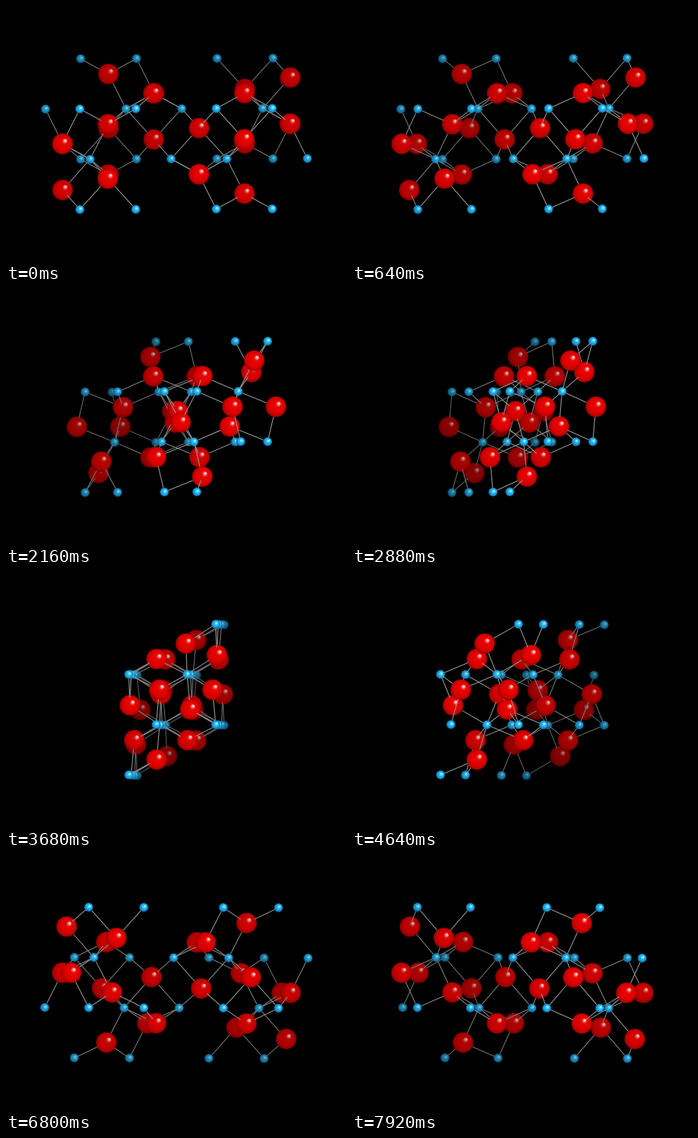
Animation, 456 px wide and 342 px high, one loop 8 s. Source, as an HTML page with a canvas:

```html
<!DOCTYPE html>
<html lang="en">
<head>
<meta charset="utf-8">
<title>Rotating crystal</title>
<style>
html, body { margin: 0; width: 100%; height: 100%; overflow: hidden; background: #000; }
canvas { display: block; }
</style>
</head>
<body>
<canvas id="stage" width="456" height="342"></canvas>
<script>
const ctx = document.getElementById('stage').getContext('2d');
const CX = 228.5, CY = 171.4;
const STEP = 80, STEPS = 100, TURN = 2, START = 0.5;

const LAYER = 30.5;                  // half the spacing of oxygen layers
const ROW = 33.7;                    // half the spacing of metal rows
const COL = 19.45;                   // half the spacing of metal columns
const R = 41.3;                      // oxygen distance from its column axis
const RY = R / 2, RZ = R * Math.sqrt(3) / 2;

const RED = {
  r: 13.8, hx: 4.6, hy: -4.8,
  stops: [[0, 255, 245, 240], [0.09, 255, 190, 185], [0.2, 246, 60, 55],
          [0.29, 232, 6, 6], [0.7, 222, 0, 0], [0.88, 196, 0, 0], [1, 140, 0, 0]]
};
const BLUE = {
  r: 6, hx: 1.6, hy: -1.6,
  stops: [[0, 215, 255, 255], [0.22, 100, 225, 255], [0.45, 42, 184, 240],
          [0.75, 26, 152, 212], [1, 12, 92, 140]]
};

const atoms = [];

// Adds an atom and its mirror through the centre.
function addPair(kind, x, y, z) {
  atoms.push({ kind, x, y, z }, { kind, x: -x, y: -y, z: -z });
}

function addMetals(xs, y, z) {
  for (const x of xs) addPair(BLUE, x, y, z);
}

addMetals([-129, -54, 54, 129], -3 * ROW, 3 * COL);
addMetals([-129, -54, 54, 129], -ROW, -3 * COL);
addMetals([-175.8, -67.8, 7, 115.5], -ROW, COL);

addPair(RED, -3 * LAYER, -3 * ROW + RY, 3 * COL - RZ);
addPair(RED, 3 * LAYER, -3 * ROW + R, 3 * COL);
addPair(RED, 5 * LAYER, -ROW - R, COL);
addPair(RED, -LAYER, -ROW - RY, COL - RZ);
addPair(RED, -LAYER, -ROW - RY, COL + RZ);
addPair(RED, 3 * LAYER, -ROW - RY, -3 * COL + RZ);
addPair(RED, -3 * LAYER, -ROW + RY, -3 * COL + RZ);
addPair(RED, 5 * LAYER, -ROW + RY, COL - RZ);
addPair(RED, 5 * LAYER, -ROW + RY, COL + RZ);
addPair(RED, -3 * LAYER, ROW - R, 3 * COL);
addPair(RED, LAYER, ROW - R, -COL);

const bonds = [];
for (const a of atoms) {
  if (a.kind !== RED) continue;
  for (const b of atoms) {
    if (b.kind !== BLUE) continue;
    const len = Math.hypot(a.x - b.x, a.y - b.y, a.z - b.z);
    if (len < 66) bonds.push({ a, b, from: RED.r / len, to: 1 - BLUE.r / len });
  }
}

const light = depth => Math.max(0.5, Math.min(1, 0.88 + depth * 0.0021));
const shade = (f, r, g, b) => `rgb(${r * f | 0},${g * f | 0},${b * f | 0})`;
const mix = (p, q, t) => p + (q - p) * t;

function project(atom, cos, sin) {
  atom.px = CX + atom.x * cos + atom.z * sin;
  atom.py = CY + atom.y - atom.x * 0.003;
  atom.depth = atom.x * sin - atom.z * cos;
}

function drawAtom({ kind, px, py, depth }) {
  const { r, hx, hy, stops } = kind, f = light(depth);
  const g = ctx.createRadialGradient(px + hx, py + hy, 0, px, py, r);
  for (const [at, ...rgb] of stops) g.addColorStop(at, shade(f, ...rgb));
  ctx.fillStyle = g;
  ctx.beginPath();
  ctx.arc(px, py, r, 0, Math.PI * 2);
  ctx.fill();
}

function drawBond({ a, b, from, to, depth }) {
  ctx.strokeStyle = shade(light(depth), 150, 150, 150);
  ctx.beginPath();
  ctx.moveTo(mix(a.px, b.px, from), mix(a.py, b.py, from));
  ctx.lineTo(mix(a.px, b.px, to), mix(a.py, b.py, to));
  ctx.stroke();
}

function draw(now) {
  const step = Math.floor(now / STEP) % STEPS;
  const angle = (START + step * TURN) * Math.PI / 180;
  const cos = Math.cos(angle), sin = Math.sin(angle);
  for (const atom of atoms) project(atom, cos, sin);
  for (const bond of bonds) bond.depth = (bond.a.depth + bond.b.depth) / 2;

  ctx.fillStyle = '#000';
  ctx.fillRect(0, 0, 456, 342);
  ctx.lineWidth = 1.1;
  [...atoms, ...bonds]
    .sort((p, q) => p.depth - q.depth)
    .forEach(item => item.kind ? drawAtom(item) : drawBond(item));
}

function tick() {
  draw(performance.now());
  requestAnimationFrame(tick);
}
tick();
</script>
</body>
</html>
```
